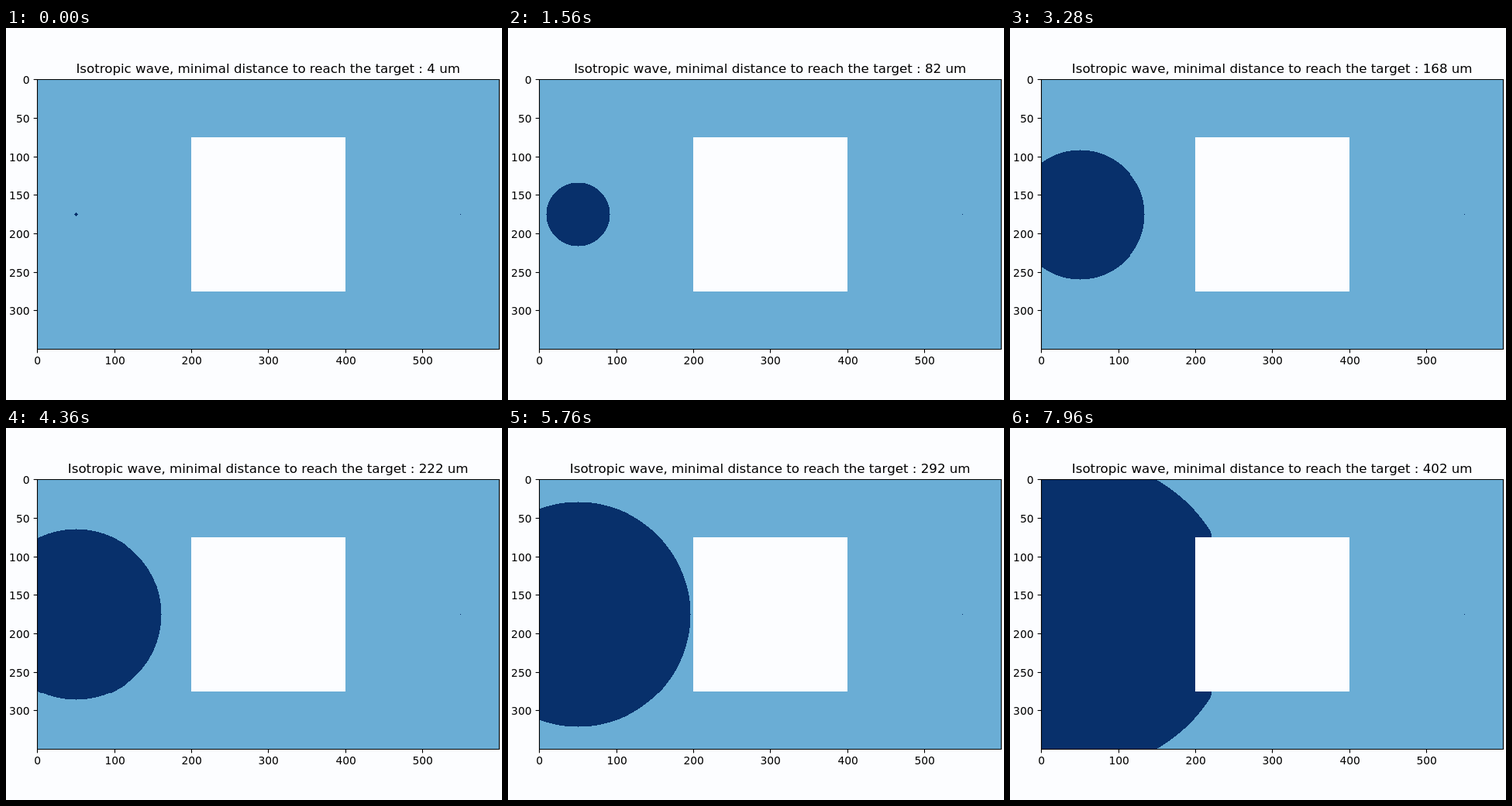
These frames come from a looping animation (640x480 px, 8 s). An HTML page with a canvas:

```html
<!DOCTYPE html>
<html lang="en">
<head>
<meta charset="utf-8">
<title>Isotropic wave</title>
<style>
  html, body { margin: 0; width: 100%; height: 100%; overflow: hidden; background: #fcfdff; }
  canvas, svg { position: absolute; left: 0; top: 0; width: 640px; height: 480px; }
  text { font: 13.89px "DejaVu Sans", sans-serif; fill: #000; }
  #title { font-size: 16.67px; }
  .middle { text-anchor: middle; }
  .end { text-anchor: end; }
  path { stroke: #000; stroke-width: 1.11; fill: none; }
</style>
</head>
<body>
<canvas id="wave" width="640" height="480"></canvas>
<svg id="axes" viewBox="0 0 640 480">
  <path d="M40.5 66.5H636.5V414.5H40.5Z"/>
  <text id="title" class="middle" x="338.2" y="58">Isotropic wave, minimal distance to reach the target : <tspan id="distance">4</tspan> um</text>
</svg>
<script>
const STEP_MS = 40, STEPS = 200;
const SCALE = 0.993, LEFT = 40.31, TOP = 66.44;   // grid cells to stage pixels
const COLS = 600, ROWS = 350;
const emitter = { x: 50, y: 175 }, goal = { x: 550, y: 175 };
const box = { x0: 200, y0: 75, x1: 400, y1: 275 };
const LIGHT = 0xffd5ad6a, DARK = 0xff6b3008;      // ABGR

const axes = document.getElementById('axes');
const distance = document.getElementById('distance');
const ctx = document.getElementById('wave').getContext('2d');

function add(tag, attributes, content = '') {
  const node = document.createElementNS(axes.namespaceURI, tag);
  for (const key in attributes) node.setAttribute(key, attributes[key]);
  node.textContent = content;
  axes.append(node);
}

const tickPixel = (start, value) => Math.floor(start + (value + 0.5) * SCALE) + 0.5;

for (let value = 0; value <= 500; value += 100) {
  const x = tickPixel(LEFT, value);
  add('path', { d: `M${x} 414.5v4.86` });
  add('text', { class: 'middle', x: x + 0.2, y: 434 }, value);
}
for (let value = 0; value <= 300; value += 50) {
  const y = tickPixel(TOP, value);
  add('path', { d: `M40.5 ${y}h-4.86` });
  add('text', { class: 'end', x: 30.6, y: y + 5.5 }, value);
}

// Shortest path from the emitter to a cell, bending round the near box corners.
function pathLength(x, y) {
  if (x === goal.x && y === goal.y) return 0;
  if (x >= box.x0 && x < box.x1 && y >= box.y0 && y < box.y1) return NaN;
  const dx = x - emitter.x, dy = Math.abs(y - emitter.y);
  const cornerX = box.x0 - emitter.x, cornerY = emitter.y - box.y0;
  const hidden = dx > cornerX && dy * cornerX < dx * cornerY;
  return hidden
    ? Math.hypot(cornerX, cornerY) + Math.hypot(dx - cornerX, dy - cornerY)
    : Math.sqrt(dx * dx + dy * dy);
}

const plotX = 40, plotY = 66, width = 596, height = 348;
const picture = ctx.createImageData(width, height);
const pixels = new Uint32Array(picture.data.buffer);
const cell = (pixel, start, count) =>
  Math.max(0, Math.min(count - 1, Math.floor((pixel + 0.5 - start) / SCALE)));
const reach = Float64Array.from(pixels, (_, i) => pathLength(
  cell(plotX + i % width, LEFT, COLS),
  cell(plotY + Math.floor(i / width), TOP, ROWS)));

function draw(step) {
  const radius = step + 2;
  reach.forEach((length, i) => {
    if (!isNaN(length)) pixels[i] = length <= radius ? DARK : LIGHT;
  });
  ctx.putImageData(picture, plotX, plotY);
  distance.textContent = 2 * radius;
}

const begin = performance.now();
let shown = -1;
function tick() {
  const step = Math.floor((performance.now() - begin) / STEP_MS) % STEPS;
  if (step !== shown) draw(shown = step);
  requestAnimationFrame(tick);
}
tick();
</script>
</body>
</html>
```
